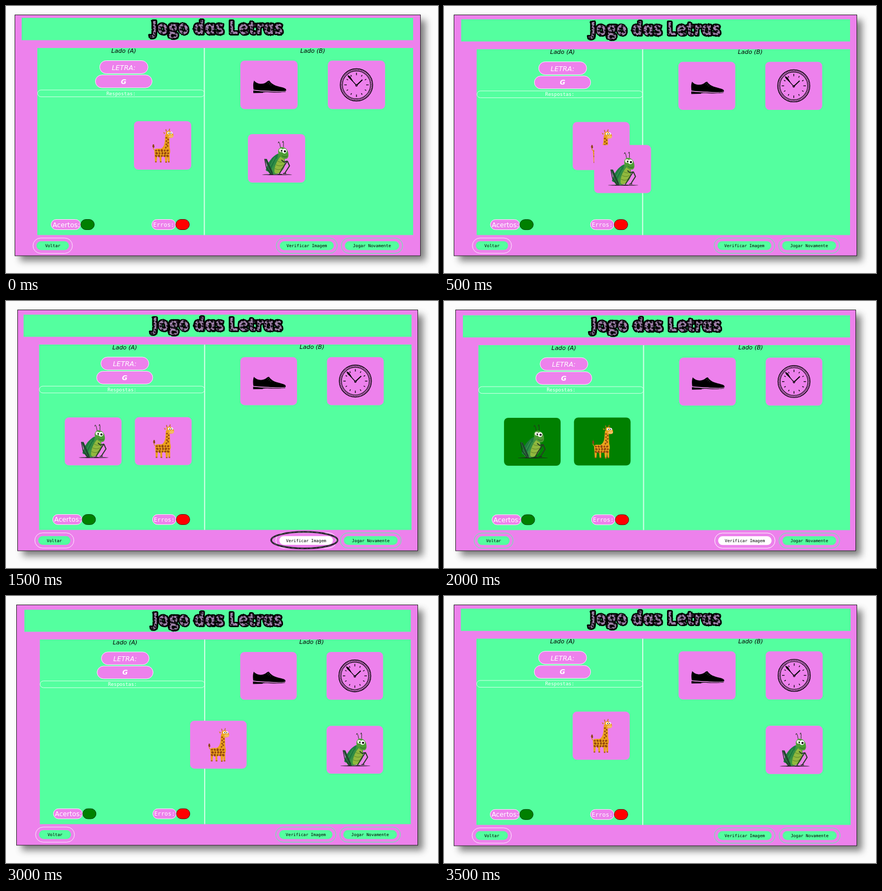
An HTML page that plays this animation: 800 by 496 pixels, repeating every 4 s.

```html
<!DOCTYPE html>
<html lang="pt">
<head>
<meta charset="utf-8">
<title>Jogo das Letras</title>
<style>
html, body { margin: 0; width: 100%; height: 100%; overflow: hidden; background: #fcfcfc; }
svg { display: block; width: 800px; height: 496px; }
text { font-family: "DejaVu Sans", Verdana, sans-serif; text-anchor: middle; }
.mono { font-family: "DejaVu Sans Mono", monospace; }
.it { font-style: italic; }
.white { fill: #fff; }
.title { font: italic 700 34px "Open Sans", sans-serif; text-anchor: start;
  stroke: #000; stroke-width: 5.6px; stroke-linejoin: round; paint-order: stroke; }
</style>
</head>
<body>
<svg id="stage" viewBox="0 0 800 496" xmlns="http://www.w3.org/2000/svg">
<defs>
  <filter id="blur" x="-10%" y="-10%" width="120%" height="120%"><feGaussianBlur stdDeviation="6.500"/></filter>
  <filter id="rough" x="-5%" y="-20%" width="110%" height="140%">
    <feTurbulence type="fractalNoise" baseFrequency=".16" numOctaves="2" seed="4"/>
    <feDisplacementMap in="SourceGraphic" scale="2.500" xChannelSelector="R" yChannelSelector="G"/>
  </filter>
  <pattern id="mottle" width="13" height="11" patternUnits="userSpaceOnUse">
    <rect width="13" height="11" fill="#a384ae"/>
    <path d="M0 2l4-1 1 3-3 2zM7 5l4-2 2 3-4 2zM3 8l3 0 1 3-4 0zM9 0l3 0-1 2z" fill="#15101a"/>
    <path d="M5 1l2 1-1 3zM1 7l2 0-1 3z" fill="#6c6470"/>
  </pattern>

  <g id="shoe">
    <path d="M25.500 37c3 4 8 6 13 6 5 0 9-2 12-5l3-1c2 3 5 6 9 8 6 3 14 4 19 6 3 1 4 3 3 5-8 2-22 1-31 0-10 0-20-1-29-2-1-6-1-12 1-17z"/>
    <path d="M24 55.500c10 1 20 2 29 2 11 1 23 1 31-.5l0 1c-9 1.500-23 1.500-33 .5-3 0-6 0-9 .5l0 .8-18 .4z"/>
    <path d="M25 54.800c9 1.500 18 2 28 2s23 .8 31 0" fill="none" stroke="#c9a9c9" stroke-width=".6"/>
    <path d="M50 42l4-3M53 44l3-2.500M56 46l2-2" stroke="#666" stroke-width=".6"/>
  </g>

  <g id="clock" fill="none" stroke="#000">
    <circle cx="53" cy="45" r="30" stroke-width="1.400"/>
    <circle cx="53" cy="45" r="27.900" stroke-width="1.500" stroke-dasharray="1.400 1.520"/>
    <circle cx="53" cy="45" r="25.900" stroke-width="1.100"/>
    <g id="ticks" stroke-width="1.300"></g>
    <path d="M53 46L37 28" stroke-width="1.300"/>
    <path d="M46 38L39 31.500l-1.500-3.500 3.500 1.600z" fill="#000" stroke-width="1.200"/>
    <path d="M53 46l11-10.500" stroke-width="1.900"/>
    <circle cx="53" cy="46" r="1.700" fill="#000"/>
    <circle cx="53" cy="46" r=".7" fill="#ed81ec" stroke="none"/>
  </g>

  <g id="giraffe">
    <path d="M39 54c-3-1-4-4-3-8" fill="none" stroke="#dd9218" stroke-width="1.300"/>
    <path d="M35 43l2 0 1 5-2 2-2-3z" fill="#8a4314"/>
    <path d="M60 19l-1-4M65 18l1-4" stroke="#b8691a" stroke-width="1.500"/>
    <path d="M58 25l-1 13c-1 7-3 11-7 13H41c-3 1-4 4-3 8l1 17h3l1-11 4 1 1 10h3l0-10 6 0 1 11h3l1-11 1 10h3l0-15c2-4 1-8 0-12l-1-24z" fill="#eba21d"/>
    <path d="M59 21c2-4 8-4 10-1 3 2 5 5 4 8-1 4-9 4-13 1z" fill="#eba21d"/>
    <path d="M58 22l-4-2 2 4z" fill="#cf8618"/>
    <path d="M64 27c3-2 8-2 9 0 1 4-6 5-9 2z" fill="#f2bd64"/>
    <g fill="#97470f" id="spots"></g>
    <path d="M39 74.500h3v2h-3zM48 74.500h3v2h-3zM58 75h3v2h-3zM63 74.500h3v2h-3z" fill="#a65a17"/>
    <circle cx="64" cy="22" r="2.400" fill="#fff"/><circle cx="69" cy="22" r="2.400" fill="#fff"/>
    <circle cx="64.700" cy="22.300" r=".9"/><circle cx="68.600" cy="22.300" r=".9"/>
  </g>

  <g id="cricket">
    <ellipse cx="54" cy="75.300" rx="28" ry="1" fill="#222" opacity=".8"/>
    <path d="M61 26c-2-4-1-9-4-12l-1 3M66 24c-1-4 1-8-1-11l-1 3" fill="none" stroke="#26331f" stroke-width="1"/>
    <path d="M57 36c-10 5-18 16-20 30 0 6 4 9 9 9 9 0 17-4 21-13 3-8 2-17-2-23z" fill="#3f9440"/>
    <path d="M56 36C45 41 36 53 33 67c4 4 8 3 11-1 6-9 11-19 12-30z" fill="#1f7a40"/>
    <path d="M60 42c-6 7-11 18-11 28 1 5 8 4 13-1 6-7 7-19 4-26z" fill="#91b83e"/>
    <path d="M55 50q6 4 11 1M52 57q7 4 14 0M50 64q7 4 13 0" fill="none" stroke="#597f28" stroke-width=".9"/>
    <path d="M50 43L37 67M53 46L44 65" stroke="#4fac58" stroke-width=".8"/>
    <path d="M56 32c0-6 6-10 11-7 6 2 8 9 8 14 0 4-2 7-5 7-5 0-8-2-11-6-2-2-3-5-3-8z" fill="#4d9d35"/>
    <path d="M63 40q5 4 10 1" fill="none" stroke="#2b5a1d" stroke-width=".9"/>
    <path d="M31 46l4 0 11 24 1 5-5 0z" fill="#27613a"/>
    <path d="M31 46l3 16 9 13M34 47l11 26" fill="none" stroke="#1c3325" stroke-width="1.400"/>
    <path d="M73 50l-8 12-7 12M73 50l4 9-9 14M73 50l-6 2-5-4" fill="none" stroke="#263d24" stroke-width="1.900" stroke-linejoin="round"/>
    <path d="M39 75h8M55 75h8M65 73h6" stroke="#222" stroke-width="1.300"/>
    <circle cx="61" cy="30" r="3.500" fill="#e6ecdc"/><circle cx="67.500" cy="31.500" r="4.400" fill="#fff"/>
    <circle cx="62.500" cy="31" r="1.400"/><circle cx="68.500" cy="32" r="2"/>
  </g>
</defs>

<rect width="800" height="496" fill="#fcfcfc"/>
<rect id="shade" fill="#4a4a4a" opacity=".7" filter="url(#blur)"/>
<rect id="win" fill="#ed81ec" stroke="#222"/>
<g id="board"></g>
</svg>

<script>
const PINK = '#ed81ec', MINT = '#54ff9f', DARK = '#008000', PALE = '#fdeafd';
const $ = id => document.getElementById(id);
const set = (el, attrs) => { for (const k in attrs) el.setAttribute(k, attrs[k]); };

const pill = (x, y, w, h, fill, stroke, id = '') =>
  `<rect id="${id}" x="${x}" y="${y}" width="${w}" height="${h}" rx="${h / 2}" fill="${fill}" stroke="${stroke}"/>`;
const label = (x, y, size, text, cls = '') =>
  `<text x="${x}" y="${y}" font-size="${size}" class="${cls}">${text}</text>`;
const button = (id, x, w, text) =>
  pill(x, 431, w, 28.5, PINK, MINT, id + 'Ring') +
  pill(x + 6.5, 437, w - 13, 16.5, MINT, 'none', id + 'Face') +
  label(x + w / 2, 448.3, 7.8, text, 'mono');
const card = (id, x = 0, y = 0) =>
  `<g id="${id}Card" transform="translate(${x} ${y})"><rect width="106" height="90" rx="8" fill="${PINK}"/><use href="#${id}"/></g>`;

$('ticks').innerHTML = Array.from({ length: 12 }, (_, i) =>
  `<path d="M53 ${i % 3 ? 24 : 22.5}V27" transform="rotate(${i * 30} 53 45)"/>`).join('');

// Spots on the neck, then on the body.
const spot = (x, y, r, turn) =>
  `<ellipse cx="${x}" cy="${y}" rx="${r}" ry="${r * .8}" transform="rotate(${turn} ${x} ${y})"/>`;
let spots = '';
for (let i = 0; i < 7; i++)
  spots += spot(60 + (i % 2) * 3.2 - (i > 4 ? 1 : 0), 31 + i * 3, 1.8, i * 50);
for (let i = 0; i < 15; i++)
  spots += spot(41 + (i % 5) * 5.3 + (i > 4 && i < 10 ? 1 : 0), 54.5 + Math.floor(i / 5) * 5, 2 + (i % 3) * .3, i * 40);
$('spots').innerHTML = spots;

$('board').innerHTML =
  `<rect x="29" y="22" width="725" height="41.500" fill="${MINT}"/>
   <rect x="58" y="78" width="696" height="347.500" fill="${MINT}"/>
   <g filter="url(#rough)"><text class="title" fill="url(#mottle)" transform="translate(271 51.500) skewX(12)">Jogo das Letras</text></g>
   <path d="M367.300 78V425.500" stroke="#fff" stroke-width="2" opacity=".75"/>` +
  label(218, 87, 11, 'Lado (A)', 'it') + label(568, 86.5, 11, 'Lado (B)', 'it') +
  pill(173.5, 101.5, 89.5, 24, PINK, PALE) + label(218, 118.5, 12.5, 'LETRA:', 'it white') +
  pill(165.5, 128, 105, 24, PINK, PALE) +
  '<text x="218" y="144.500" font-size="12.500" font-weight="700" class="it white">G</text>' +
  pill(58.5, 156, 309, 12.7, 'none', '#d4ffe8') + label(213, 165.5, 9, 'Respostas:', 'mono white') +
  pill(83.5, 396.5, 54.5, 19, PINK, PALE) + label(111.5, 410.5, 12.3, 'Acertos:', 'white') +
  pill(138.5, 396.5, 25, 19, DARK, '#064006') +
  pill(270, 396.5, 44, 19, PINK, PALE) + label(292, 410, 10.8, 'Erros:', 'mono white') +
  pill(314.5, 396.5, 25, 19, '#f00', '#600') +
  button('back', 50, 73, 'Voltar') + button('check', 500.5, 113, 'Verificar Imagem') +
  button('again', 621, 113.5, 'Jogar Novamente') +
  card('shoe', 434, 101.5) + card('clock', 596, 101.5) + card('giraffe') + card('cricket') +
  `<g id="mark" fill="none"><ellipse cx="553.700" cy="444.700" rx="62" ry="15.500" stroke="#2b2530" stroke-width="3.200"/>
   <ellipse cx="553.700" cy="444.700" rx="62" ry="15.500" stroke="#777" stroke-width=".8" stroke-dasharray="5 4 2 6"/></g>`;

// Window edges, view scale and shift, card places; one step per half second.
const homeG = [434, 240.5], homeC = [596, 240.5], leftG = [237, 214], leftC = [106, 214.5];
const steps = [
  { win: [16, 16, 768, 464], view: [1, 0, 0], g: leftG, c: [448, 238] },
  { win: [18, 16, 765, 464], view: [.9935, 2.9, 2.8], g: leftG, c: [277, 257] },
  { win: [18, 16, 765, 464], view: [.9925, 3.3, 3.3], g: leftG, c: leftC },
  { win: [21, 16, 763, 464], view: [.991, 3.8, 3.6], g: leftG, c: leftC, hover: 1, mark: 1 },
  { win: [21, 16, 763, 464], view: [.989, 6.3, 4.8], g: leftG, c: leftC, hover: 1, right: 1 },
  { win: [23, 18, 760, 460], view: [.978, 8.6, 5.6], g: homeG, c: homeC },
  { win: [19, 16, 763, 463], view: [.987, 5.4, 3.8], g: [340, 231], c: homeC },
  { win: [18, 16, 765, 464], view: [.9957, 2.3, 1.6], g: leftG, c: homeC }
];

function place(id, [x, y], fill) {
  const el = $(id + 'Card');
  set(el, { transform: `translate(${x} ${y})` });
  set(el.firstChild, { fill });
}

function draw(t) {
  const s = steps[Math.floor(t % 4000 / 500)];
  const [x, y, r, b] = s.win, [k, dx, dy] = s.view;
  const size = { width: r - x - 1, height: b - y - .5 };
  set($('win'), { x: x + .5, y: y + .5, ...size });
  set($('shade'), { x: x + 10, y: y + 10, ...size });
  set($('board'), { transform: `translate(${dx} ${dy}) scale(${k})` });
  const fill = s.right ? DARK : PINK;
  place('giraffe', s.g, fill);
  place('cricket', s.c, fill);
  set($('backRing'), { stroke: s.right ? MINT : PALE });
  set($('checkRing'), { stroke: s.hover ? '#fff' : MINT });
  set($('checkFace'), { fill: s.hover ? '#fff' : MINT });
  set($('mark'), { visibility: s.mark ? 'visible' : 'hidden' });
}

const start = performance.now();
function tick() {
  draw(performance.now() - start);
  requestAnimationFrame(tick);
}
tick();
</script>
</body>
</html>
```
